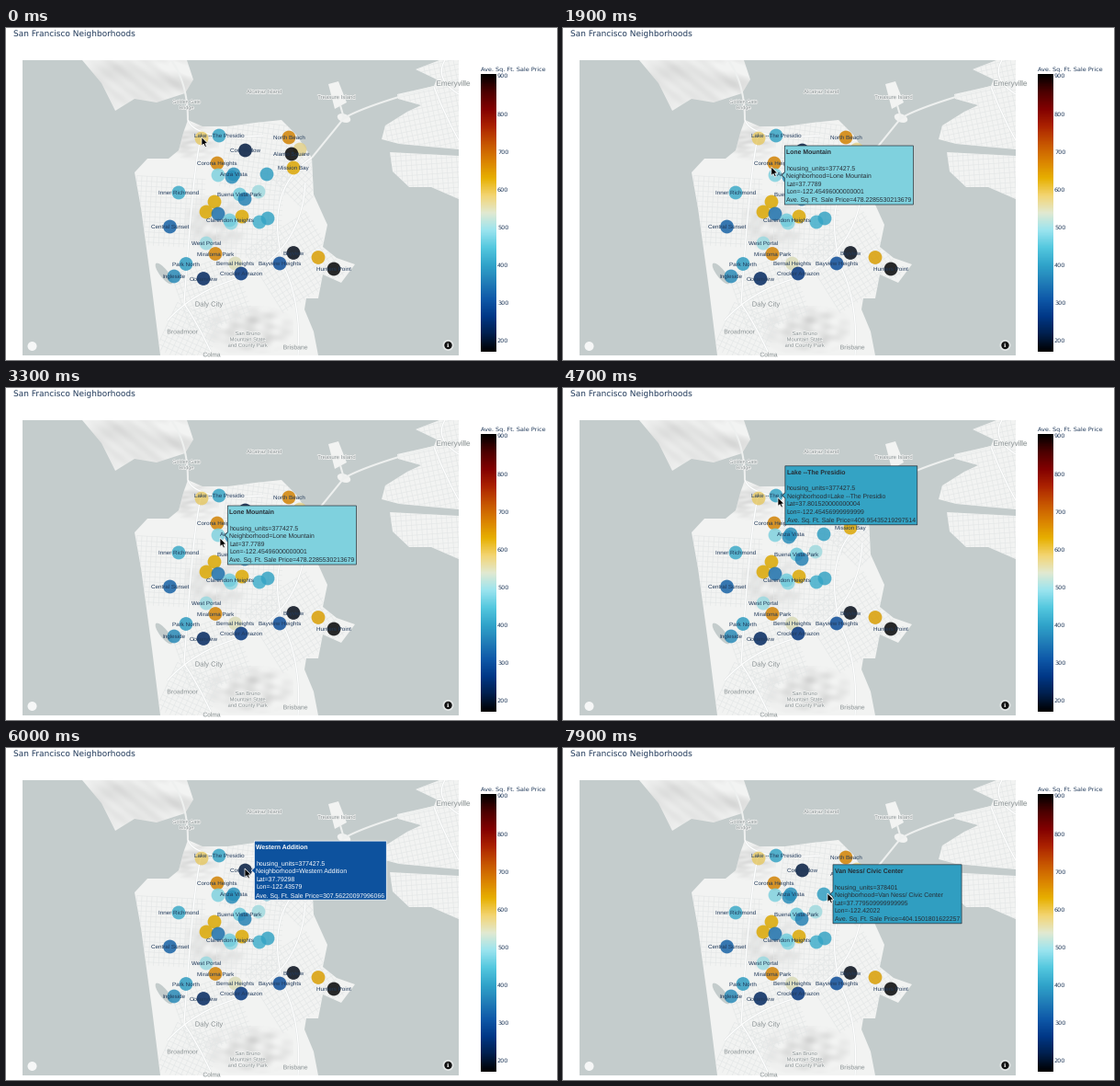
A matplotlib script for the animation above (8 s loop, 600 by 361 pixels).

```python
import numpy as np
import matplotlib.pyplot as plt
from matplotlib.animation import FuncAnimation
from matplotlib.collections import LineCollection
from matplotlib.colors import LinearSegmentedColormap
from matplotlib.patches import Circle, Ellipse, Polygon, Rectangle
from matplotlib.patheffects import withStroke

W, H, DPI = 600, 361, 100
FRAMES, STEP = 80, 100
NAVY, WATER, LAND, GREY = "#20395a", "#c4cccc", "#f2f3f2", "#899193"
SANS, ARIAL = "DejaVu Sans", "Liberation Sans"
LOW, HIGH = 172, 903.6
PX = 72 / DPI
plt.rcParams["text.hinting"] = "none"

ICEFIRE = LinearSegmentedColormap.from_list("icefire", [
    "#000000", "#001f4d", "#003786", "#0e58a8", "#217eb8", "#30a4ca",
    "#54c8df", "#9be4ef", "#e1e9d1", "#f3d573", "#e7b000", "#da8200",
    "#c65400", "#ac2301", "#820000", "#4c0000", "#000000"], N=512)

fig = plt.figure(figsize=(W / DPI, H / DPI), dpi=DPI, facecolor="white")
ax = fig.add_axes([0, 0, 1, 1])


def price_color(price):
    return np.array(ICEFIRE((price - LOW) / (HIGH - LOW))[:3]) * 0.95


def project(lat, lon):
    return 231.3 + 1517 * (lon + 122.45496), 160 - 1910 * (lat - 37.7789)


def text(x, y, s, px, color=NAVY, font=SANS, ha="center", z=5, **kw):
    return ax.text(x, y + px * 0.35, s, fontsize=px * PX, color=color,
                   family=font, ha=ha, va="baseline", zorder=z, **kw)


def add(artist, clip=None):
    ax.add_artist(artist)
    if clip is not None:
        artist.set_clip_path(clip)
    return artist


def land(*points):
    return add(Polygon(points, fc=LAND, lw=0, zorder=1), frame)


def islet(x, y, w, h, angle=0):
    add(Ellipse((x, y), w, h, angle=angle, fc=LAND, lw=0, zorder=1), frame)


def roads(lines, clip, width, color="white", z=2):
    add(LineCollection(lines, colors=color, linewidths=width, zorder=z), clip)


def streets(x, y, size, angle, clip):
    """Square patch of crossing streets, turned by an angle."""
    a = np.radians(angle)
    turn = np.array([[np.cos(a), np.sin(a)], [-np.sin(a), np.cos(a)]])
    r, lines = size / 2, []
    for off in np.arange(-r, r, 5.5):
        for ends in ([(-r, off), (r, off)], [(off, -r), (off, r)]):
            lines.append(np.array(ends) @ turn + (x, y))
    roads(lines, clip, 0.45, "#e4e7e7", 1.5)


def hills(x, y, rx, ry, clip, seed):
    """Soft shaded relief built from a few random waves."""
    rng = np.random.default_rng(seed)
    u, v = np.meshgrid(np.linspace(-1, 1, 2 * rx), np.linspace(-1, 1, 2 * ry))
    relief = sum(np.sin(a * u + b * v + c) for a, b, c in
                 rng.normal(0, 9, (9, 3))) / 3
    rgba = np.full(u.shape + (4,), 0.55)
    fade = np.clip(1.3 - u ** 2 - v ** 2, 0, 1)
    rgba[..., 3] = fade * np.clip(0.13 + 0.08 * relief, 0, 0.35)
    img = ax.imshow(rgba, extent=(x - rx, x + rx, y + ry, y - ry), zorder=1.2)
    img.set_clip_path(clip)


def bend(a, b, c):
    """Quadratic curve from a to c, pulled towards b."""
    t = np.linspace(0, 1, 20)[:, None]
    a, b, c = map(np.array, (a, b, c))
    return (1 - t) ** 2 * a + 2 * t * (1 - t) * b + t ** 2 * c


# Base map
frame = add(Rectangle((18, 35), 475, 321, fc=WATER, lw=0, zorder=0))
city = land(
    (168, 356), (159, 284), (147, 196), (140, 157), (154, 142), (177, 142),
    (188, 133), (193, 114), (198, 100), (214, 107), (242, 107), (271, 103),
    (300, 100), (316, 116), (333, 141), (335, 181), (350, 214), (345, 238),
    (360, 250), (380, 257), (365, 277), (345, 268), (340, 294), (327, 294),
    (325, 306), (335, 330), (340, 356))
marin = land((83, 35), (104, 60), (119, 90), (140, 77), (164, 81), (195, 71),
             (204, 56), (197, 35))
oakland = land(
    (472, 35), (446, 45), (469, 56), (466, 63), (426, 72), (427, 77),
    (452, 84), (437, 91), (413, 106), (409, 121), (428, 126), (493, 132),
    (493, 35))
alameda = land((418, 135), (493, 139), (493, 186), (463, 173), (439, 173),
               (421, 156))
land((351, 61), (362, 58), (371, 81), (358, 88))
islet(368, 98, 15, 9, 20)
islet(280, 69, 7, 3, 20)
add(Ellipse((172, 267), 9, 28, angle=-38, fc=WATER, lw=0, zorder=1.6), city)

hills(150, 56, 70, 40, marin, 2)
hills(265, 328, 48, 26, city, 5)
hills(228, 212, 34, 30, city, 7)
hills(206, 124, 26, 20, city, 9)

for x, y, size, angle, clip in [
        (178, 200, 75, 3, city), (275, 140, 75, 8, city),
        (322, 165, 45, 45, city), (265, 215, 70, 3, city),
        (315, 255, 80, -32, city), (225, 290, 70, -20, city),
        (200, 335, 55, 25, city), (465, 90, 110, -12, oakland),
        (460, 155, 80, -4, alameda)]:
    streets(x, y, size, angle, clip)

highways = [
    bend((176, 318), (205, 285), (260, 270)),
    bend((260, 270), (322, 240), (326, 168)),
    bend((318, 356), (322, 300), (302, 258)),
    bend((302, 258), (280, 175), (333, 141)),
    bend((198, 100), (206, 122), (280, 117)),
    bend((212, 119), (203, 160), (194, 300)),
    bend((194, 300), (208, 320), (225, 356)),
    bend((466, 64), (478, 95), (493, 122)),
    bend((478, 35), (466, 55), (493, 72))]
bridges = [[(333, 141), (368, 98)], bend((368, 98), (392, 84), (466, 64)),
           bend((180, 35), (198, 60), (198, 100)), [(364, 84), (368, 98)]]
roads(highways, frame, 1.5, "#dfe3e3", 2.1)
roads(highways, frame, 0.95, z=2.2)
roads(bridges, frame, 1.5, "#eef0ef", z=2.2)

for x, y, px, s in [
        (196.5, 80, 5.4, "Golden Gate\nBridge"),
        (281, 69, 5.8, "Alcatraz Island"), (360, 75, 6, "Treasure Island"),
        (221, 300, 7.6, "Daly City"), (192, 330, 6.8, "Broadmoor"),
        (263, 332, 5.8, "San Bruno\nMountain State\nand County Park"),
        (315, 347, 6.8, "Brisbane"), (224, 355, 6.6, "Colma"),
        (487, 60, 8, "Emeryville")]:
    for i, line in enumerate(s.split("\n")):
        label = text(x, y + 6.4 * i, line, px, GREY, ARIAL, z=2.5,
                     path_effects=[withStroke(linewidth=0.9, foreground=LAND)])
        label.set_clip_path(frame)

# Neighborhoods: x, y, price per sq. ft., shown label
PLACES = [
    (213, 120, 585, ""), (232, 117, 410, "Lake --The Presidio"),
    (308, 119, 668, "North Beach"), (260.5, 133, 212, "Cow Hollow"),
    (320, 132, 570, ""), (311, 137, 174, "Alamo Square"),
    (313, 152, 632, "Mission Bay"), (230, 147, 668, "Corona Heights"),
    (231, 160, 478, ""), (246, 162, 380, ""), (248, 159, 385, "Anza Vista"),
    (284, 159, 404, ""), (188, 179, 420, "Inner Richmond"),
    (227, 189, 629, ""), (275, 178, 500, ""),
    (254.5, 181, 465, "Buena Vista Park"), (260, 186, 365, ""),
    (218, 200, 629, ""), (231, 202, 345, ""), (257, 205, 629, ""),
    (245, 212, 485, ""), (243.5, 209, 470, "Clarendon Heights"),
    (276, 211, 425, ""), (285, 207, 410, ""),
    (178.5, 216, 325, "Central Sunset"), (218, 234, 497, "West Portal"),
    (228, 245.5, 668, "Miraloma Park"), (313, 244.5, 185, "Bayview"),
    (340, 249.5, 640, ""), (357, 262, 174, "Hunters Point"),
    (196, 256.5, 400, "Park North"), (183, 270, 375, "Ingleside"),
    (215, 272.5, 235, "Oceanview"), (249.5, 256, 545, "Bernal Heights"),
    (256, 267, 260, "Crocker Amazon"), (298, 256, 295, "Bayview Heights")]
xs, ys, prices, names = zip(*PLACES)
ax.scatter(xs, ys, s=(14.8 * PX) ** 2, c=[price_color(p) for p in prices],
           alpha=0.84, linewidths=0, zorder=3)
for x, y, name in zip(xs, ys, names):
    text(x, y, name, 6.25, NAVY, ARIAL, z=4)

add(Circle((28.5, 346), 5, fc="#f6f7f7", lw=0, zorder=4))
add(Circle((481.5, 345), 6, fc="white", alpha=0.5, lw=0, zorder=4))
add(Circle((481.5, 345), 4.2, fc="#111111", lw=0, zorder=4))
text(481.5, 345, "i", 6.5, "white", "DejaVu Serif", weight="bold")

# Title and colour bar
text(7.5, 6.3, "San Francisco Neighborhoods", 9.02, ha="left")
text(517, 44.3, "Ave. Sq. Ft. Sale Price", 6.45, ha="left")
ax.imshow(np.linspace(1, 0, 512)[:, None], cmap=ICEFIRE,
          extent=(517, 533.5, 351.8, 50.2), zorder=1)
for value in range(200, 1000, 100):
    text(535, 52.1 + (900 - value) * 0.411, str(value), 6.45, ha="left")

ax.set(xlim=(0, W), ylim=(H, 0), aspect="auto")
ax.axis("off")

# Hover boxes: start (ms), name, units, lat, lon, price
HOVERS = [
    (1900, "Lone Mountain", "377427.5", "37.7789", "-122.45496000000001",
     "478.2285530213679"),
    (4300, "Lake --The Presidio", "377427.5", "37.801520000000004",
     "-122.45456999999999", "409.95435219297514"),
    (5500, "Western Addition", "377427.5", "37.79298", "-122.43579",
     "307.56220097996066"),
    (7100, "Van Ness/ Civic Center", "378401", "37.779509999999995",
     "-122.42022", "404.1501801622257")]


def hover_box(name, units, lat, lon, price):
    x, y = project(float(lat), float(lon))
    color = price_color(float(price))
    ink = "white" if color @ (0.299, 0.587, 0.114) < 0.4 else "#262c34"
    rows = [name, "", f"housing_units={units}", f"Neighborhood={name}",
            f"Lat={lat}", f"Lon={lon}", f"Ave. Sq. Ft. Sale Price={price}"]
    left, top, low = x + 10, y - 32, y + 32
    right = left + 4 + 8.05 * len(rows[-1]) ** 0.76
    box = add(Polygon(
        [(left, top), (right, top), (right, low), (left, low), (left, y + 3),
         (left - 3.2, y), (left, y - 3)],
        fc=color, ec=ink, lw=0.5, zorder=8))
    labels = [text(left + 1.9, y - 25.6 + 8.7 * i, s, 6.92, ink, ARIAL,
                   "left", 9, weight="normal" if i else "bold")
              for i, s in enumerate(rows)]
    # The box is as wide as its longest line
    fit = labels[-1].get_window_extent().transformed(
        ax.transData.inverted())
    corners = box.get_xy()
    corners[1:3, 0] = fit.x1 + 1.9
    box.set_xy(corners)
    return [box] + labels


starts = [h[0] for h in HOVERS]
boxes = [hover_box(*h[1:]) for h in HOVERS]

# Pointer stops: leave time (ms), tip x, tip y; each move lasts MOVE ms
STOPS = [(1400, 213, 118.5), (2600, 229, 156), (3800, 233, 163),
         (5200, 234, 119), (6700, 260, 131), (FRAMES * STEP, 288, 158)]
MOVE = 650
ARROW = np.array([(0, 0), (0, 9.6), (2.2, 7.6), (3.8, 11), (5.4, 10.3),
                  (3.9, 7), (6.9, 7)])
pointer = add(Polygon(ARROW, fc="black", ec="white", lw=0.5, zorder=12))


def pointer_at(ms):
    pos = np.array(STOPS[0][1:], float)
    for (leave, *a), (_, *b) in zip(STOPS, STOPS[1:]):
        p = np.clip((ms - leave) / MOVE, 0, 1)
        pos += np.subtract(b, a) * p * p * (3 - 2 * p)
    return pos


def update(n):
    ms = n * STEP
    pointer.set_xy(ARROW + pointer_at(ms))
    current = np.searchsorted(starts, ms, side="right") - 1
    for i, group in enumerate(boxes):
        for artist in group:
            artist.set_visible(i == current)
    return [pointer]


anim = FuncAnimation(fig, update, frames=FRAMES, interval=STEP, repeat=True,
                     repeat_delay=0, blit=False)
plt.show()
```
